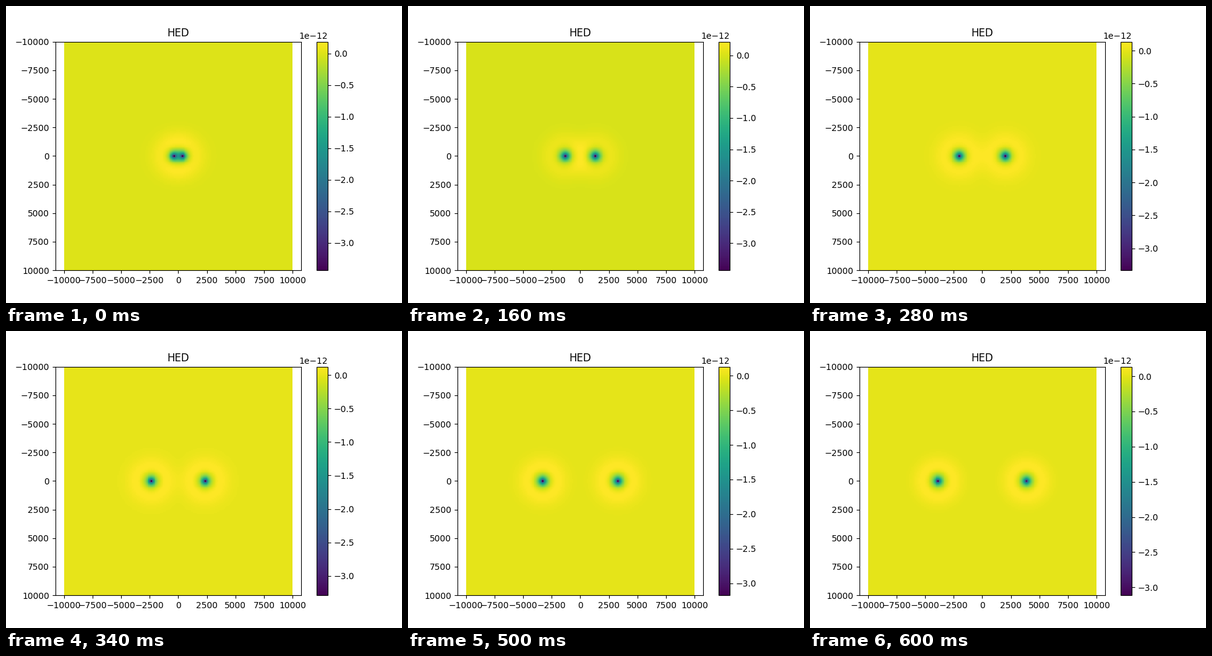
A matplotlib script for the animation above (620 ms loop, 640 px wide and 480 px high).

```python
import numpy as np
import matplotlib.pyplot as plt
from matplotlib.animation import FuncAnimation

FRAMES = 31
HALF = 10000
CELLS = 200
SKIN = 510       # diffusion length
CORE = 40        # softening radius of each pole
UNIT = 1e-12

# Radial profile: -Re K0(x * sqrt(i)) up to its second zero, in integral form
x = np.geomspace(0.05, 6.127, 600)
t = np.linspace(0, 8, 1500)
z = x[:, None] * np.exp(1j * np.pi / 4)
profile = -np.exp(-z * np.cosh(t)).real
profile = (profile.sum(axis=1) - profile[:, 0] / 2) * (t[1] - t[0])
peak = profile.max()

edges = np.linspace(-HALF, HALF, CELLS + 1)
centres = (edges[:-1] + edges[1:]) / 2
X, Y = np.meshgrid(centres, centres)


def pole(px):
    r = np.sqrt((X - px) ** 2 + Y ** 2 + CORE ** 2)
    return np.interp(r / SKIN, x, profile, right=0)


def field(i):
    """Two poles drifting apart while the cores fade and the rings grow."""
    offset = 379 + 116.4 * i
    v = pole(-offset) + pole(offset)
    low = -3.575 + 0.0187 * i - 0.00011 * i ** 2 + 0.14 * np.exp(-i / 1.2)
    ring = 0.0935 + 0.0023 * i - 0.00003 * i ** 2
    return UNIT * np.where(v > 0, v * ring / peak, v * low / v.min())


fig, ax = plt.subplots(figsize=(6.4, 4.8), dpi=100)
mesh = ax.pcolormesh(edges, edges, field(0), cmap="viridis")
ax.axis("equal")
ax.invert_yaxis()
ax.set_title("HED")
bar = fig.colorbar(mesh, ax=ax)
bar.ax.yaxis.set_offset_position("right")


def update(i):
    data = field(i)
    mesh.set_array(data)
    mesh.set_clim(data.min(), data.max())
    return [mesh]


anim = FuncAnimation(fig, update, frames=FRAMES, interval=20,
                     init_func=lambda: update(0), repeat=True, repeat_delay=0)
plt.show()
```
